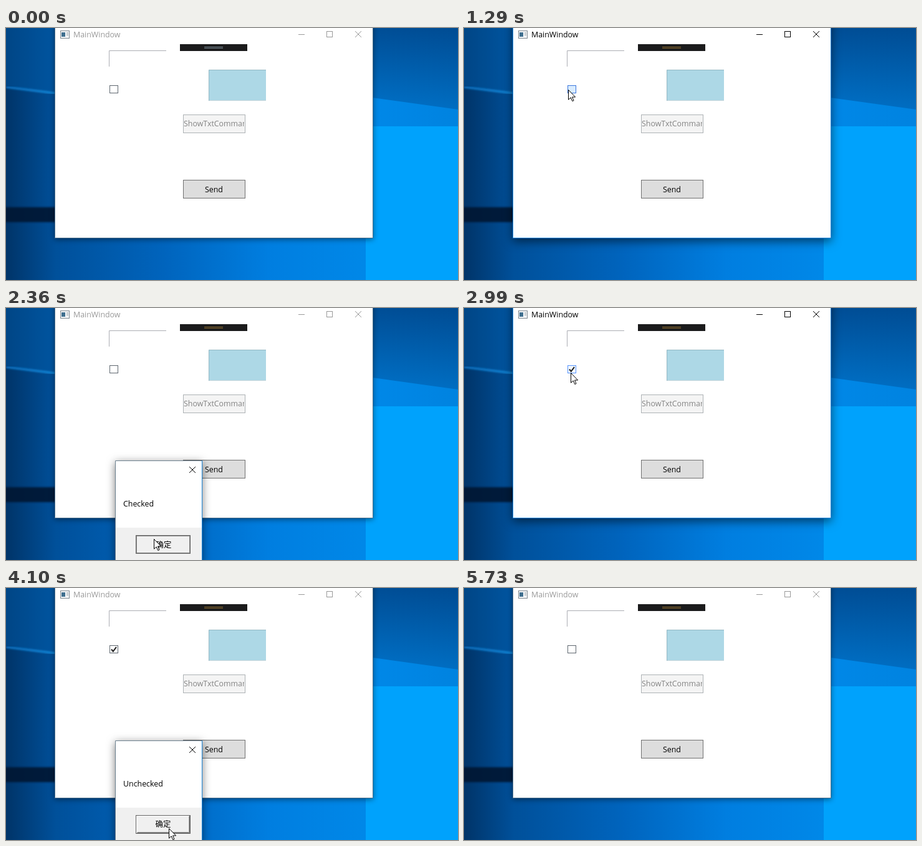
An HTML page for the animation above (5.81 s loop, 725 by 405 pixels).

```html
<!DOCTYPE html>
<html lang="en">
<head>
<meta charset="utf-8">
<title>MainWindow</title>
<style>
html, body { margin: 0; width: 100%; height: 100%; overflow: hidden; background: #0060b0; }
svg { display: block; width: 725px; height: 405px; }
text { font: 12.4px "Open Sans", "Noto Sans", "Noto Sans CJK SC", "Noto Sans CJK", sans-serif; }
.line { fill: none; stroke-width: 1; }
#main { --ink: #999; --edge: #52738f; --shade: drop-shadow(0 2px 4px rgba(0,0,0,.45)); }
#main.active { --ink: #000; --edge: #1883d7; --shade: drop-shadow(0 5px 8px rgba(0,0,0,.55)); }
#frame { stroke: var(--edge); fill: #fff; filter: var(--shade); }
#title { fill: var(--ink); }
#caption { stroke: var(--ink); }
#dialogFrame { filter: drop-shadow(0 3px 7px rgba(0,0,0,.5)); }
#dialog { transform-origin: 245px 328px; }
</style>
</head>
<body>
<svg viewBox="0 0 725 405">
  <defs>
    <linearGradient id="sky" x2="1" y2="0">
      <stop offset="0" stop-color="#003468"/>
      <stop offset=".11" stop-color="#00509a"/>
      <stop offset=".35" stop-color="#0064bd"/>
      <stop offset=".58" stop-color="#007ee0"/>
      <stop offset=".8" stop-color="#0088e8"/>
      <stop offset="1" stop-color="#0083e0"/>
    </linearGradient>
    <linearGradient id="dusk" x2="0" y2="1">
      <stop offset="0" stop-color="#003a7a" stop-opacity=".75"/>
      <stop offset="1" stop-color="#003a7a" stop-opacity=".3"/>
    </linearGradient>
    <linearGradient id="beam" x2="1" y2="0">
      <stop offset="0" stop-color="#0a78cc"/>
      <stop offset="1" stop-color="#1a92e4"/>
    </linearGradient>
    <filter id="soft"><feGaussianBlur stdDeviation="1.6"/></filter>
    <clipPath id="labelClip"><rect x="285" y="140" width="97" height="28"/></clipPath>
  </defs>

  <g id="wallpaper">
    <rect width="725" height="405" fill="url(#sky)"/>
    <path d="M0 0H78V104L0 94Z" fill="#005ba8" opacity=".45"/>
    <path d="M0 95L80 105" stroke="url(#beam)" stroke-width="3" filter="url(#soft)"/>
    <rect x="-9" y="288" width="96" height="24" fill="#001633" opacity=".9" filter="url(#soft)"/>
    <path d="M588 0H725V131L588 112Z" fill="url(#dusk)"/>
    <rect x="577" y="158" width="148" height="247" fill="#00a2fc"/>
  </g>

  <g id="main">
    <rect id="frame" x="78.5" y="-20.5" width="510" height="358"/>
    <g class="line">
      <rect x="87.5" y="4.5" width="14" height="12" fill="#f4f6f8" stroke="#7d878f"/>
      <rect x="89" y="7" width="6" height="7" fill="#3f6f8f"/>
      <path d="M97 7.5H100M97 9.5H100M97 11.5H100" stroke="#a5adb3"/>
    </g>
    <text id="title" x="108" y="15">MainWindow</text>
    <g id="caption" class="line">
      <path d="M469 10.5H479"/>
      <rect x="514.5" y="5.5" width="9" height="9"/>
      <path d="M560 5L570 15M570 5L560 15"/>
    </g>

    <rect x="279" y="26" width="108" height="11" fill="#1b1b1c"/>
    <path id="grip" class="line" d="M318 30.5H348M318 32.5H348"/>
    <path class="line" d="M165.5 62V36.5H257" stroke="#abadb3"/>

    <rect id="box" x="166.5" y="92.5" width="13" height="12"/>
    <path id="tick" class="line" d="M169 98.5L171.8 101.8L177 94.8" stroke="#212121" style="stroke-width:2"/>

    <rect x="325" y="67" width="92" height="50" fill="#add8e6"/>
    <path class="line" d="M325.5 117V67.5H417" stroke="#93b7c3"/>
    <path class="line" d="M326 116.5H417" stroke="#c2d3d9"/>

    <rect x="284.5" y="139.5" width="99" height="29" fill="#f4f4f4" stroke="#adb2b5"/>
    <text x="285" y="158" fill="#838383" clip-path="url(#labelClip)">ShowTxtCommand</text>
    <rect x="284.5" y="244.5" width="99" height="29" fill="#ddd" stroke="#707070"/>
    <text x="333.5" y="264" text-anchor="middle">Send</text>
  </g>

  <g id="dialog">
    <rect id="dialogFrame" x="175" y="245" width="140" height="166" fill="#fff"/>
    <rect x="175" y="353" width="140" height="58" fill="#f0f0f0"/>
    <path class="line" d="M175.5 411V245.5H314" stroke="#6b7f8e"/>
    <path class="line" d="M314.5 245V411" stroke="#1883d7"/>
    <path class="line" d="M294 255L304 265M304 255L294 265" stroke="#000"/>
    <text id="message" x="188" y="319"></text>
    <rect x="208.5" y="365.5" width="87" height="29" fill="#f0f0f0" stroke="#646464"/>
    <g id="raised" class="line">
      <path d="M209.5 393V366.5H294" stroke="#fff"/>
      <path d="M210 393.5H294.5V366" stroke="#696969"/>
      <path d="M211 392.5H293.5V367" stroke="#a0a0a0"/>
    </g>
    <rect id="sunken" class="line" x="209.5" y="366.5" width="85" height="27" stroke="#8c8c8c"/>
    <text id="ok" text-anchor="middle">确定</text>
  </g>

  <path id="arrow" d="M.5 .5V16.2L4.2 12.8L6.8 18.6L9 17.6L6.5 12H11.6Z" fill="#fff" stroke="#000"/>
  <path id="sizer" d="M0 -12L4.5 -7H1.5V7H4.5L0 12L-4.5 7H-1.5V-7H-4.5Z" fill="#fff" stroke="#000"/>
</svg>

<script>
const LOOP = 5810, TICK = 76.7;
const el = id => document.getElementById(id);

// Pointer strokes: start time, then one x,y pair per tick; the last pair holds.
const strokes = [
  [270, 456,395, 430,352, 385,290, 330,225, 275,170, 228,130, 203,112],
  [900, 180,103, 167,99],
  [1440, 170,110, 178,140, 192,190, 206,241, 217,285, 226,325, 232,350, 236,365, 237,371],
  [2510, 232,350, 222,300, 205,235, 190,175, 176,130],
  [2910, 171,110, 171,104, 171,100, 171,96],
  [3540, 180,125, 205,215, 232,305, 255,370, 262,388, 262,387],
  [4100, 261,386],
  [4720, 288,362, 312,345, 345,322, 400,315, 470,322, 540,340, 600,362, 642,382, 667,397]
];

const dialogs = [
  { open: 1370, press: 2360, close: 2440, text: "Checked" },
  { open: 3460, press: 4330, close: 4410, text: "Unchecked" }
];
const fadeIn = [0.3, 0.8, 1], fadeOut = [0.6, 0.2];

const within = (t, a, b) => t >= a && t < b;
const ticksSince = (t, start) => {
  let k = 0;
  while (start + Math.round((k + 1) * TICK / 10) * 10 <= t) k++;
  return k;
};
const show = (id, on) => el(id).setAttribute("visibility", on ? "visible" : "hidden");
const place = (id, x, y) => el(id).setAttribute("transform", `translate(${x} ${y})`);

function pointerAt(t) {
  if (!within(t, 270, 5410)) return null;
  const [start, ...path] = strokes.filter(s => s[0] <= t).pop();
  const i = 2 * Math.min(ticksSince(t, start), path.length / 2 - 1);
  return [path[i], path[i + 1]];
}

function drawDialog(t) {
  const d = dialogs.find(d => within(t, d.open, d.close + 160));
  const node = el("dialog");
  node.style.display = d ? "" : "none";
  if (!d) return;
  const closing = t >= d.close;
  const alpha = closing
    ? fadeOut[Math.min(ticksSince(t, d.close), 1)]
    : fadeIn[Math.min(ticksSince(t, d.open), 2)];
  const pressed = within(t, d.press, d.close);
  node.style.opacity = alpha;
  node.style.transform = `scale(${0.9 + 0.1 * alpha})`;
  el("message").textContent = d.text;
  el("raised").style.display = pressed ? "none" : "";
  el("sunken").style.display = pressed ? "" : "none";
  el("ok").setAttribute("x", pressed ? 253 : 252);
  el("ok").setAttribute("y", pressed ? 385 : 384);
}

function drawCheckbox(t) {
  const pressed = within(t, 1140, 1370) || within(t, 3310, 3460);
  const hover = within(t, 970, 1140) || within(t, 2910, 3310);
  const [fill, stroke] = pressed ? ["#d9ecff", "#3c77dd"]
    : hover ? ["#f3f9ff", "#5593ff"] : ["#fff", "#606870"];
  el("box").setAttribute("fill", fill);
  el("box").setAttribute("stroke", stroke);
  show("tick", within(t, dialogs[0].close, dialogs[1].close));
}

function drawPointer(t) {
  const p = pointerAt(t), resizing = within(t, 4800, 4870);
  show("arrow", p && !resizing);
  show("sizer", p && resizing);
  if (p) place(resizing ? "sizer" : "arrow", ...p);
}

function draw(t) {
  const modal = dialogs.some(d => within(t, d.open, d.close));
  el("main").classList.toggle("active", within(t, 1140, 5730) && !modal);
  el("grip").setAttribute("stroke", t < 1140 ? "#71808a" : "#80622a");
  drawCheckbox(t);
  drawDialog(t);
  drawPointer(t);
}

const begin = performance.now();
function run() {
  draw((performance.now() - begin) % LOOP);
  requestAnimationFrame(run);
}
run();
</script>
</body>
</html>
```
